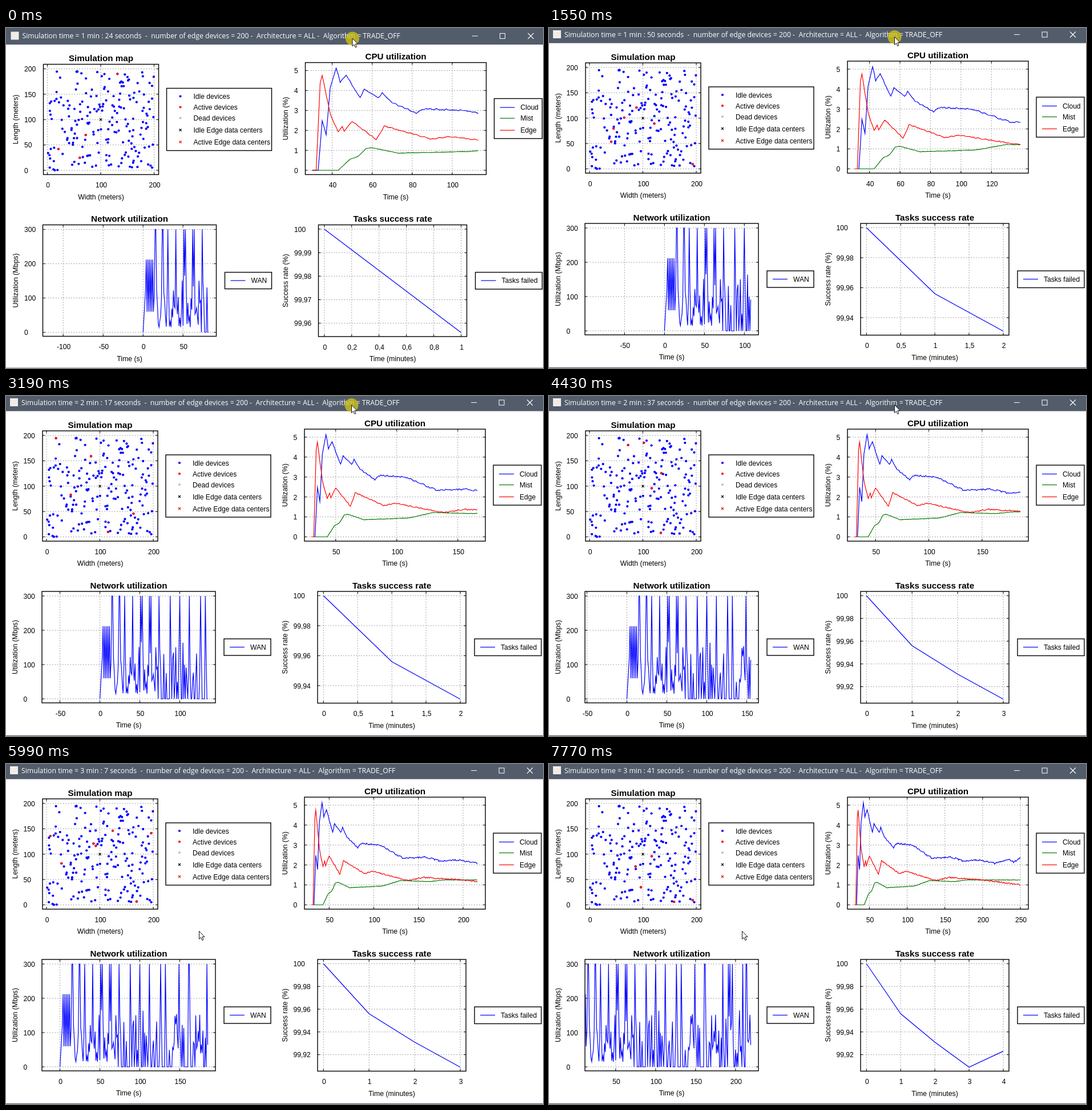
Animation, 941 px wide and 595 px high, one loop 8000 ms. Source, as an HTML page with a canvas:

```html
<!DOCTYPE html>
<html lang="en">
<head>
<meta charset="utf-8">
<title>Simulation charts</title>
<style>
html, body { margin: 0; width: 941px; height: 595px; overflow: hidden; background: #fff; }
canvas { display: block; }
</style>
</head>
<body>
<canvas id="stage" width="941" height="595"></canvas>
<script>
const ctx = document.getElementById('stage').getContext('2d');
const LOOP = 8000, BLUE = '#00f', RED = '#f00', GREEN = '#007800';

// Moments at which the window repaints, in ms
const repaints = [0, 160, 390, 1090, 1550, 1860, 2330, 2870, 3190, 3880, 4040, 4430, 5130, 5360, 5990,
  6220, 6840, 7000, 7770];
const simSeconds = ms => Math.round(84 + .0165 * ms + .0027 * Math.max(0, ms - 4430));

function seeded(seed) {
  return () => {
    seed = (seed * 1664525 + 1013904223) >>> 0;
    return seed / 4294967296;
  };
}
function valueAt(keys, t) {
  const i = keys.findIndex(k => k[0] >= t);
  if (i < 1) return keys[i < 0 ? keys.length - 1 : 0][1];
  const [t0, v0] = keys[i - 1], [t1, v1] = keys[i];
  return v0 + (v1 - v0) * (t - t0) / (t1 - t0);
}

// CPU load: one sample per second through a few key points, with a little jitter
function load(keys, jitter, seed) {
  const rand = seeded(seed);
  return Array.from({ length: 222 }, (_, i) => {
    const v = valueAt(keys, i + 30);
    return [i + 30, v && v + (rand() - .5) * jitter];
  });
}
const cloud = load([[33, 0], [35, 2.48], [37, 1.75], [39, 4.1], [42, 5.16], [44, 4.43], [47, 4.75], [54, 3.64],
  [56, 4.08], [63, 3.6], [65, 3.9], [70, 3.4], [82, 2.87], [86, 3.08], [107, 3], [133, 2.33], [158, 2.4],
  [174, 2.2], [194, 2.25], [216, 2.08], [235, 2.28], [241, 2.15], [250, 2.35]], .08, 3);
const mist = load([[43, 0], [49, .56], [53, .7], [57, 1.1], [60, 1.13], [73, .86], [110, .95], [130, 1.22],
  [163, 1.17], [178, 1.25], [250, 1.25]], .02, 5);
const edge = load([[32, 0], [34, 4.35], [35, 4.75], [39, 2.85], [43, 1.9], [45, 2.2], [46, 1.95], [50, 2.45],
  [62, 1.54], [66, 2.22], [89, 1.58], [99, 1.68], [138, 1.22], [156, 1.37], [195, 1.27], [250, 1.01]], .06, 7);

// WAN traffic: bursts that saturate the link over random low traffic
const bursts = [15, 16, 24, 25, 31, 41, 51, 53, 62, 64, 74, 88, 100, 112, 126, 132, 149, 161, 162, 184, 191,
  193, 196, 209, 213, 214];
const traffic = seeded(21);
const wan = Array.from({ length: 221 }, (_, t) => {
  const r = traffic(), quiet = t > 70 && r < .4;
  if (bursts.includes(t)) return [t, 300];
  if (t < 14) return [t, t < 4 ? t * 40 : t % 2 ? 60 : 212];
  if (bursts.includes(t - 1)) return [t, 40 + 130 * r];
  return [t, quiet ? 0 : 15 + 150 * r * r];
});

const success = [100, 99.956, 99.931, 99.909, 99.923];

const scatter = seeded(11);
const devices = Array.from({ length: 200 }, () => [scatter() * 200, scatter() * 196]);
function activeAt(t) {
  const pick = seeded(t * 7919);
  return Array.from({ length: 4 + t % 4 }, () => devices[Math.floor(pick() * devices.length)]);
}

function text(s, x, y, { size = 12.1, align = 'left', color = '#000', weight = '',
  font = '"Liberation Sans", Arial, sans-serif' } = {}) {
  ctx.font = `${weight} ${size}px ${font}`;
  ctx.textAlign = align;
  ctx.fillStyle = color;
  ctx.fillText(s, x, y + size * .36);
}
function path(points, color, width = 1.2) {
  ctx.strokeStyle = color;
  ctx.lineWidth = width;
  ctx.beginPath();
  points.forEach(([x, y]) => ctx.lineTo(x, y));
  ctx.stroke();
}
function frame(x0, y0, x1, y1) {
  ctx.strokeStyle = '#000';
  ctx.lineWidth = 1.4;
  ctx.strokeRect(x0, y0, x1 - x0, y1 - y0);
}
function dot(x, y, color, r = 2.1) {
  ctx.fillStyle = color;
  ctx.beginPath();
  ctx.arc(x, y, r, 0, 7);
  ctx.fill();
}
function cross(x, y, color, r = 2) {
  path([[x - r, y - r], [x + r, y + r]], color, 1.1);
  path([[x - r, y + r], [x + r, y - r]], color, 1.1);
}
function ticks(from, to, step, place) {
  const list = [];
  for (let v = Math.ceil(from / step - 1e-6) * step; v <= to + 1e-6; v += step) {
    const n = +v.toFixed(2);
    list.push([place(n), String(n).replace('.', ',')]);
  }
  return list;
}
function gridLine(a, b, c, d) {
  ctx.setLineDash([1.5, 3]);
  path([[a, b], [c, d]], '#888', 1);
  ctx.setLineDash([]);
  const ux = Math.sign(c - a) * 4, uy = Math.sign(d - b) * 4;
  path([[a, b], [a + ux, b + uy]], '#000', 1);
  path([[c, d], [c - ux, d - uy]], '#000', 1);
}

// Axes, grid and captions; draw() paints the data clipped to the plot
function chart({ box: [x0, y0, x1, y1], title, xName, yName, yNameX, xTicks, yTicks, draw }) {
  const midX = (x0 + x1) / 2, midY = (y0 + y1) / 2;
  for (const [p, label] of xTicks) {
    gridLine(p, y0, p, y1);
    text(label, p + 1, y1 + 18.5, { align: 'center' });
  }
  for (const [p, label] of yTicks) {
    gridLine(x0, p, x1, p);
    text(label, yNameX + 15, p + .5);
  }
  ctx.save();
  ctx.beginPath();
  ctx.rect(x0, y0, x1 - x0, y1 - y0);
  ctx.clip();
  draw();
  ctx.restore();
  frame(x0, y0, x1, y1);
  text(title, midX, y0 - 10.5, { size: 15.2, align: 'center', weight: 'bold' });
  text(xName, midX, y1 + 39, { size: 12.3, align: 'center' });
  ctx.save();
  ctx.translate(yNameX, midY);
  ctx.rotate(-Math.PI / 2);
  text(yName, 0, 0, { size: 12.3, align: 'center' });
  ctx.restore();
}
function series(data, end, X, Y, color) {
  path(data.filter(p => p[0] <= end).map(([t, v]) => [X(t), Y(v)]), color);
}
function lineLegend(box, entries) {
  frame(...box);
  for (const [y, name, color] of entries) {
    path([[box[0] + 10, y], [box[0] + 36, y]], color);
    text(name, box[0] + 46, y);
  }
}

function drawMap(t) {
  const X = v => 71 + v * .935, Y = v => 246.5 - v * .8875;
  chart({
    box: [64, 61, 266, 254], title: 'Simulation map', xName: 'Width (meters)', yName: 'Length (meters)', yNameX: 15.5,
    xTicks: ticks(0, 200, 100, X), yTicks: ticks(0, 200, 50, Y),
    draw() {
      devices.forEach(([x, y]) => dot(X(x), Y(y), BLUE));
      activeAt(t).forEach(([x, y]) => dot(X(x), Y(y), RED));
      cross(X(100), Y(100), '#000');
    }
  });
  frame(280, 103, 464, 212);
  [['Idle devices', 117.5, BLUE, dot], ['Active devices', 136.5, RED, dot], ['Dead devices', 155.5, '#c0c0c0', dot],
    ['Idle Edge data centers', 176.5, '#000', cross], ['Active Edge data centers', 197.5, RED, cross]]
    .forEach(([name, y, color, mark]) => { mark(304, y - .5, color); text(name, 327, y); });
}

function drawCpu(t) {
  const end = t + 29;
  const X = v => 535 + (v - 30) * 291 / (end - 30), Y = v => 246.5 - v * 34.9;
  chart({
    box: [523, 58, 840, 254], title: 'CPU utilization', xName: 'Time (s)', yName: 'Utilization (%)', yNameX: 488.5,
    xTicks: ticks(30, end, end > 160 ? 50 : 20, X), yTicks: ticks(0, 5, 1, Y),
    draw() {
      series(cloud, end, X, Y, BLUE);
      series(mist, end, X, Y, GREEN);
      series(edge, end, X, Y, RED);
    }
  });
  lineLegend([854, 121, 938, 191], [[136.5, 'Cloud', BLUE], [155.5, 'Mist', GREEN], [176.5, 'Edge', RED]]);
}

function drawNetwork(t) {
  const end = t - 2;
  const X = v => 353.5 - (end - v) * 1.4, Y = v => 530 - v * .6;
  chart({
    box: [63, 342, 367, 537], title: 'Network utilization', xName: 'Time (s)', yName: 'Utilization (Mbps)', yNameX: 15.5,
    xTicks: ticks(end - 206, end + 8, 50, X), yTicks: ticks(0, 300, 100, Y),
    draw: () => series(wan, end, X, Y, BLUE)
  });
  lineLegend([382, 425, 464, 454], [[439.5, 'WAN', BLUE]]);
}

function drawTasks(t) {
  const n = Math.floor((t + 30) / 60);
  const values = success.slice(0, n + 1), low = Math.min(...values);
  const X = v => 556.3 + v * 239.7 / n, Y = v => 349.5 + (100 - v) * 181 / (100 - low);
  chart({
    box: [546, 342, 806, 537.5], title: 'Tasks success rate', xName: 'Time (minutes)', yName: 'Success rate (%)', yNameX: 488.5,
    xTicks: ticks(0, n, [.2, .5][n - 1] || 1, X), yTicks: ticks(low, 100, n < 2 ? .01 : .02, Y),
    draw: () => path(values.map((v, i) => [X(i), Y(v)]), BLUE)
  });
  lineLegend([821, 425, 938, 454.5], [[439.5, 'Tasks failed', BLUE]]);
}

function drawTitleBar(t) {
  ctx.fillStyle = '#525c6b';
  ctx.fillRect(-5, -5, 960, 31.5);
  ctx.fillStyle = '#f0ece8';
  ctx.fillRect(7, 4, 14, 14);
  text(`Simulation time = ${Math.floor(t / 60)} min : ${t % 60} seconds\u00a0 -\u00a0 number of edge devices = 200 -\u00a0 ` +
    'Architecture = ALL -\u00a0 Algorithm = TRADE_OFF', 27, 11.5,
    { size: 12.26, color: '#fff', font: '"Open Sans", "Noto Sans", sans-serif' });
  path([[815, 11.5], [825, 11.5]], '#fff', 1);
  ctx.strokeRect(864, 7, 9, 9);
  cross(918, 11.5, '#fff', 5);
}

function drawCursor(x, y, halo) {
  if (halo) dot(x, y + .5, 'rgba(215,200,16,.75)', 12);
  ctx.beginPath();
  [[0, 0], [0, 14], [3, 11], [5.3, 16], [7.5, 15], [5.3, 10.2], [9.5, 10]].forEach(([a, b]) => ctx.lineTo(x + a, y + b));
  ctx.closePath();
  ctx.fillStyle = '#fff';
  ctx.fill();
  ctx.strokeStyle = '#111';
  ctx.lineWidth = 1;
  ctx.stroke();
}

function render(now) {
  const ms = now % LOOP;
  const t = simSeconds(repaints.filter(start => start <= ms).pop());
  const early = ms < 1550;
  ctx.fillStyle = '#fff';
  ctx.fillRect(0, 0, 941, 595);
  ctx.fillStyle = early ? '#a9adb3' : '#465468';
  ctx.fillRect(0, 594, 941, 1);
  // The view jumps slightly up and left once
  ctx.save();
  if (early) ctx.translate(1.5, 2.5);
  drawMap(t);
  drawCpu(t);
  drawNetwork(t);
  drawTasks(t);
  drawTitleBar(t);
  if (ms < 5130) drawCursor(605.5, 15.5, ms < 4430);
  else drawCursor(338.5, 292.5);
  ctx.restore();
  requestAnimationFrame(() => render(performance.now()));
}
render(performance.now());
</script>
</body>
</html>
```
